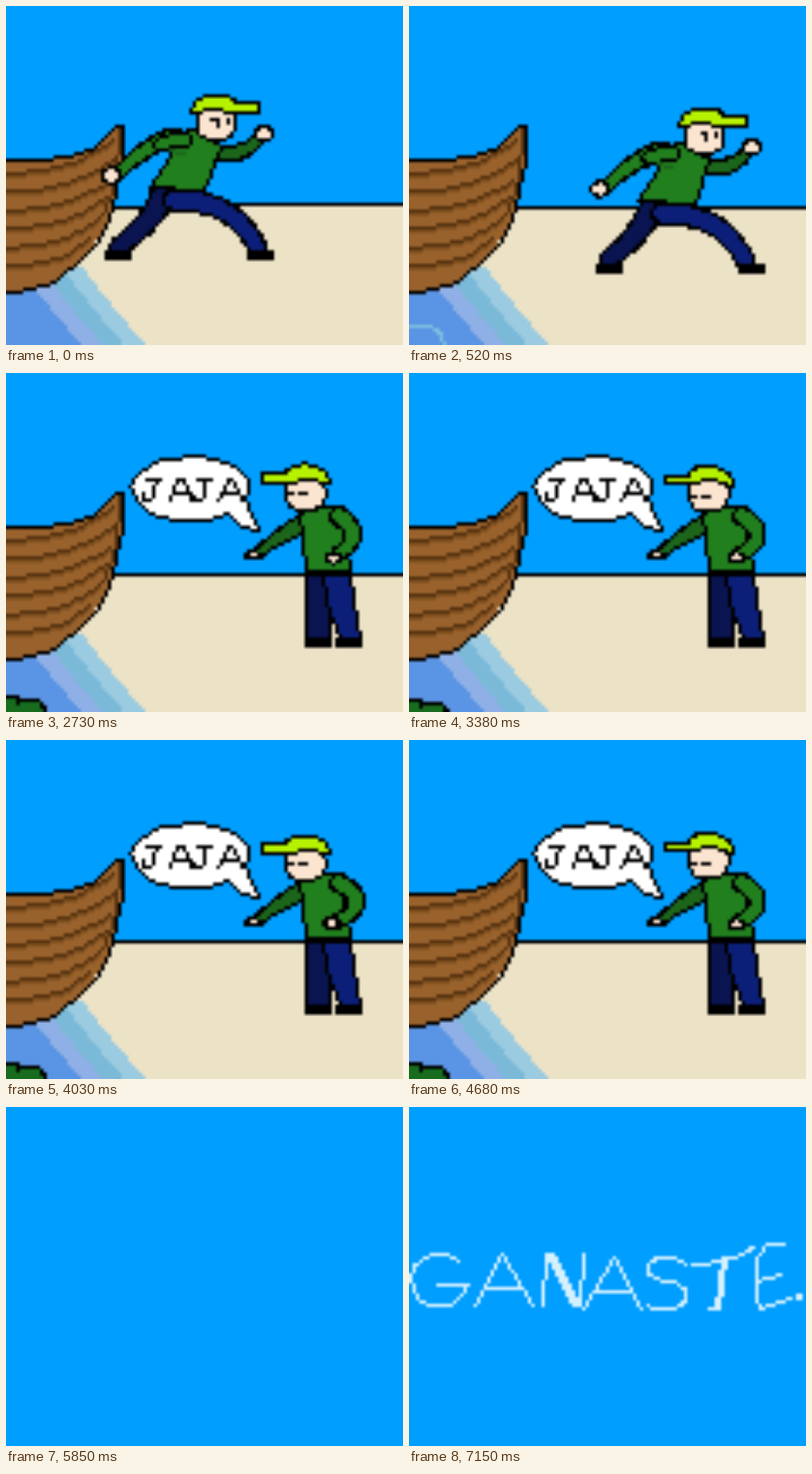
These frames come from a looping animation (410 by 350 pixels, 8.19 s). An HTML page with a canvas:

```html
<!DOCTYPE html>
<html lang="es">
<head>
<meta charset="utf-8">
<title>Ganaste</title>
<style>
  html, body { margin: 0; width: 100%; height: 100%; overflow: hidden; background: #009eff; }
  canvas { position: absolute; left: 0; top: 0; width: 410px; height: 350px; }
</style>
</head>
<body>
<canvas id="stage" width="117" height="100" role="img" aria-label="JAJA. GANASTE."></canvas>
<script>
const PX = 3.5, STEP = 130, LOOP = 8190, W = 410, H = 350, TAU = Math.PI * 2;
const SKY = '#009eff', SAND = '#ece2c6', INK = '#000', GREEN = '#217f1e', FAR = '#1c661c',
      LIME = '#b6f200', SKIN = '#fce5d0', NAVY = '#0c1f78', DARK = '#0a1450',
      WOOD = '#99622d', WORN = '#80501f', GRAIN = '#573310', CROC = '#176c1e', RIPPLE = '#79bfe0';
const WATER = ['#9bcbe0', '#7bb9d8', '#8fb0e6', '#5a94e4'];
const g = document.getElementById('stage').getContext('2d');
const mix = (a, b, u) => a + (b - a) * u;
let ox = 0, oy = 0, axis = null;

// Shift what follows; with an axis, x first becomes axis - x
function place(dx = 0, dy = 0, mirror = null) { ox = dx; oy = dy; axis = mirror; }

function cells(flat) {
  const out = [];
  for (let i = 0; i < flat.length; i += 2) {
    const x = axis === null ? flat[i] : axis - flat[i];
    out.push([(x + ox) / PX, (flat[i + 1] + oy) / PX]);
  }
  return out;
}

// Bezier curve of any degree, as a flat list of points
function bez(flat, n = 16) {
  const out = [];
  for (let k = 0; k <= n; k++) {
    let p = flat;
    while (p.length > 2) p = p.slice(2).map((v, i) => mix(p[i], v, k / n));
    out.push(...p);
  }
  return out;
}

// Elliptic arc; a power below 1 squares it off
function arc(cx, cy, rx, ry, from = 0, to = TAU, power = 1) {
  const out = [], bend = v => Math.sign(v) * Math.abs(v) ** power;
  for (let k = 0; k <= 24; k++) {
    const a = mix(from, to, k / 24);
    out.push(cx + rx * bend(Math.cos(a)), cy + ry * bend(Math.sin(a)));
  }
  return out;
}

// Hard-edged line, one cell wide
function line(flat, color = INK) {
  const p = cells(flat).map(q => q.map(Math.floor));
  g.fillStyle = color;
  for (let i = 1; i < p.length; i++) {
    const [x0, y0] = p[i - 1], [x1, y1] = p[i];
    const n = Math.max(Math.abs(x1 - x0), Math.abs(y1 - y0), 1);
    for (let k = 0; k <= n; k++) {
      g.fillRect(Math.round(mix(x0, x1, k / n)), Math.round(mix(y0, y1, k / n)), 1, 1);
    }
  }
}

// Scanline fill without smoothing
function poly(flat, fill, edge) {
  const p = cells(flat), ys = p.map(q => q[1]);
  g.fillStyle = fill;
  for (let y = Math.floor(Math.min(...ys)); y <= Math.max(...ys); y++) {
    const c = y + 0.5, hits = [];
    p.forEach(([x0, y0], i) => {
      const [x1, y1] = p[(i + 1) % p.length];
      if ((y0 <= c) !== (y1 <= c)) hits.push(mix(x0, x1, (c - y0) / (y1 - y0)));
    });
    hits.sort((a, b) => a - b);
    for (let i = 0; i + 1 < hits.length; i += 2) {
      const a = Math.round(hits[i]);
      g.fillRect(a, y, Math.round(hits[i + 1]) - a, 1);
    }
  }
  if (edge) line([...flat, flat[0], flat[1]], edge);
}

function box(x0, y0, x1, y1, color) {
  poly([x0, y0, x1, y0, x1, y1, x0, y1], color);
}

// Tapering limb along a curve
function limb(flat, r0, r1, fill) {
  const p = cells(bez(flat, 30));
  for (const [grow, color] of [[PX / 2, INK], [-PX / 2, fill]]) {
    g.fillStyle = color;
    p.forEach(([x, y], i) => {
      const r = (mix(r0, r1, i / 30) + grow) / PX;
      for (let v = Math.ceil(y - r - 0.5); v + 0.5 <= y + r; v++) {
        const half = Math.sqrt(Math.max(0, r * r - (v + 0.5 - y) ** 2));
        const a = Math.round(x - half);
        g.fillRect(a, v, Math.round(x + half) - a, 1);
      }
    });
  }
}

const hand = (x, y, rx, ry) => poly(arc(x, y, rx, ry), SKIN, INK);
const shoe = (x, y) => box(x - 14, y, x + 14, y + 12, INK);

function scenery(s) {
  place();
  box(0, 0, W, H, SKY);
  box(0, 208, W, H, SAND);
  line([100, 208, W, 208]);
  if (s < 1) {
    box(220, 206, W, 212, SAND);
    line([220, 205, W, 205]);
  }
  WATER.forEach((color, i) => {
    place(-22 * i);
    poly([...bez([80, 270, 100, 300, 145, 351]), -99, 351, -99, 270], color);
  });
}

function boat() {
  place();
  const hull = [-9, 158, 36, 158, ...bez([40, 158, 88, 158, 114, 124]),
    ...bez([121, 124, 126, 215, 80, 300, -9, 296])];
  poly(hull, WOOD);
  for (let k = 0; k < 6; k++) {
    for (const [drop, color] of [[3.5, WORN], [0, GRAIN]]) {
      const y = 173 + 19 * k + drop;
      line(bez([0, y, 66, y - 2, 111 - k * k, y - 34 + k]), color);
    }
  }
  line(bez([116, 128, 117, 185, 101, 214]), GRAIN);
  line([...hull, hull[0], hull[1]]);
}

function head(open) {
  poly(arc(309, 123, 20, 18, 0, TAU, 0.7), SKIN, INK);
  if (open) {
    line([297, 119, 297, 125]);
    line([312, 120, 306, 120, 306, 127]);
  } else {
    line([292, 125, 297, 125]);
    line([303, 125, 310, 125]);
  }
  poly([264, 103, ...bez([289, 103, 292, 90, 334, 90, 334, 114]), 312, 109, 290, 112, 264, 112], LIME, INK);
}

function standingLegs() {
  poly([309, 207, 330, 207, 333, 276, 309, 276], DARK, INK);
  poly([326, 207, 356, 207, 358, 235, 366, 276, 344, 276, 330, 236], NAVY, INK);
  shoe(321, 272);
  shoe(355, 272);
}

function relaxedTorso() {
  hand(304, 197, 5, 4);
  limb([300, 150, 298, 174, 304, 190], 7, 5, GREEN);
  poly([298, 144, 328, 138, 345, 138, 354, 206, 311, 206, 302, 180], GREEN, INK);
  limb([344, 147, 356, 164, 358, 186], 9, 8, GREEN);
  hand(359, 194, 8, 6);
}

// reach 0..1 raises the pointing arm, bob pushes the elbow out
function pointingTorso(reach, bob) {
  const hx = mix(300, 256, reach), hy = mix(200, 188, reach);
  hand(hx, hy, 8, 4);
  limb([308, 155, 290, 163, hx + 7, hy - 5], 10, 5, FAR);
  poly([304, 146, 328, 138, 346, 139, 354, 206, 310, 206, 307, 172], GREEN, INK);
  limb([344, 148, 371 + 2 * bob, 168, 344, 186], 9, 7, GREEN);
  hand(338 - bob / 2, 191 - bob / 2, 8, 5);
}

// stride 0..1 spreads the legs
function runner(dx, dy, stride) {
  const back = mix(160, 117, stride), front = mix(196, 259, stride);
  place(dx, dy);
  limb([160, 198, 150, 224, back, 248], 12, 9, DARK);
  limb([174, 200, mix(190, 235, stride), 200, front, 249], 11, 9, NAVY);
  shoe(back, 252);
  shoe(front + 5, 252);
  limb([212, 150, 240, 158, 258, 140], 9, 6, FAR);
  limb([174, 136, 146, 142, 116, 172], 10, 6, GREEN);
  poly([172, 130, 198, 126, 222, 144, 206, 190, 148, 187, 170, 156], GREEN, INK);
  limb([184, 138, 172, 138, 160, 143], 7, 7, GREEN);
  line([168, 150, 182, 151], FAR);
  hand(109, 175, 9, 8);
  hand(266, 132, 9, 7);
  place(dx, dy - 3, 525);
  head(true);
}

function man(s) {
  if (s < 5) {
    const stride = s % 2 ? 0.35 : 1;
    runner(22 * s, 3.5 * s - 10 * (1 - stride), stride);
    return;
  }
  const bob = s < 17 ? 0 : 2 - 2 * Math.cos((s - 17) * TAU / 4);
  place(0, 0, s < 8 ? 675 : null);
  standingLegs();
  if (s < 14) relaxedTorso(); else pointingTorso(s < 15 ? 0.5 : 1, bob);
  place(0, bob, s < 7 ? 643 : null);
  head(s < 14);
}

function crocodile(s) {
  const up = Math.min(1, Math.max(0, (s - 7) / 7));
  place();
  if (s >= 3 && s < 14) line(arc(12, 347, 23, 17 + s % 2 * 3, -Math.PI, 0), RIPPLE);
  place(0, mix(24, 0, up) + (s > 17 && s % 4 === 2 ? 3.5 : 0));
  for (const [grow, color] of [[0, INK], [-PX, CROC]]) {
    poly(arc(2, 346, 14 + grow, 15 + grow, 0, TAU, 0.7), color);
    poly(arc(24, 352, 17 + grow, 17 + grow, 0, TAU, 0.7), color);
  }
}

function bubble(s) {
  if (s < 15) return;
  place();
  poly([...arc(190, 119.5, 61, 33, 0.85, TAU + 0.3), 252, 148, 262, 161, 244, 158], '#fff', INK);
  for (let i = 0; i < Math.min(4, s - 15); i++) {
    place(i > 1 ? 52 : 0);
    if (i % 2) {
      line([168, 132, 177, 111, 182, 111, 191, 132]);
      line([172, 124, 187, 124]);
    } else {
      line([145, 111, 160, 111]);
      line(bez([154, 111, 154, 142, 143, 132, 140, 125]));
    }
  }
}

function verdict(s) {
  const glow = s < 50 ? 0.2 : s < 52 ? 0.4 : s < 54 ? 0.6 : s < 55 ? 0.75 : 1;
  const ink = `rgb(${mix(0, 212, glow)}, ${mix(158, 240, glow)}, 255)`;
  const pen = (...p) => line(p, ink);
  place();
  pen(...arc(31, 178, 29, 27, -0.8, -TAU + 0.15), 30, 182);
  for (const [x, y] of [[67, 153], [181, 156]]) {
    pen(x, y + 53, x + 30, y, x + 60, y + 53);
    pen(x + 12, y + 33, x + 47, y + 33);
  }
  pen(137, 206, 140, 152);
  for (const d of [0, 3.5, 7]) pen(141 + d, 153, 168 + d, 206);
  pen(175, 206, 179, 152);
  pen(...arc(266, 167, 20, 12, -0.3, -TAU * 0.75), ...arc(262, 194, 24, 15, -TAU / 4, 2.35));
  pen(...bez([292, 163, 335, 160, 356, 144]));
  for (const d of [0, 3.5]) pen(322 + d, 157, 317 + d / 2, 207);
  pen(309, 208, 318, 208);
  pen(388, 141, 370, 143, 360, 155, 357, 202, 363, 208, 393, 199);
  pen(358, 179, 383, 173);
  box(399, 193, 406, 200, ink);
}

function draw(s) {
  if (s < 45) {
    scenery(s);
    crocodile(s);
    boat();
    man(s);
    bubble(s);
  }
  place();
  const wipe = H - (45 - s) * 40.25;
  if (wipe > 0) box(0, 0, W, Math.min(H, wipe), SKY);
  if (s >= 47) verdict(s);
}

let last = -1;
const start = performance.now();
function tick() {
  const s = Math.floor((performance.now() - start) % LOOP / STEP);
  if (s !== last) draw(last = s);
  requestAnimationFrame(tick);
}
tick();
</script>
</body>
</html>
```
